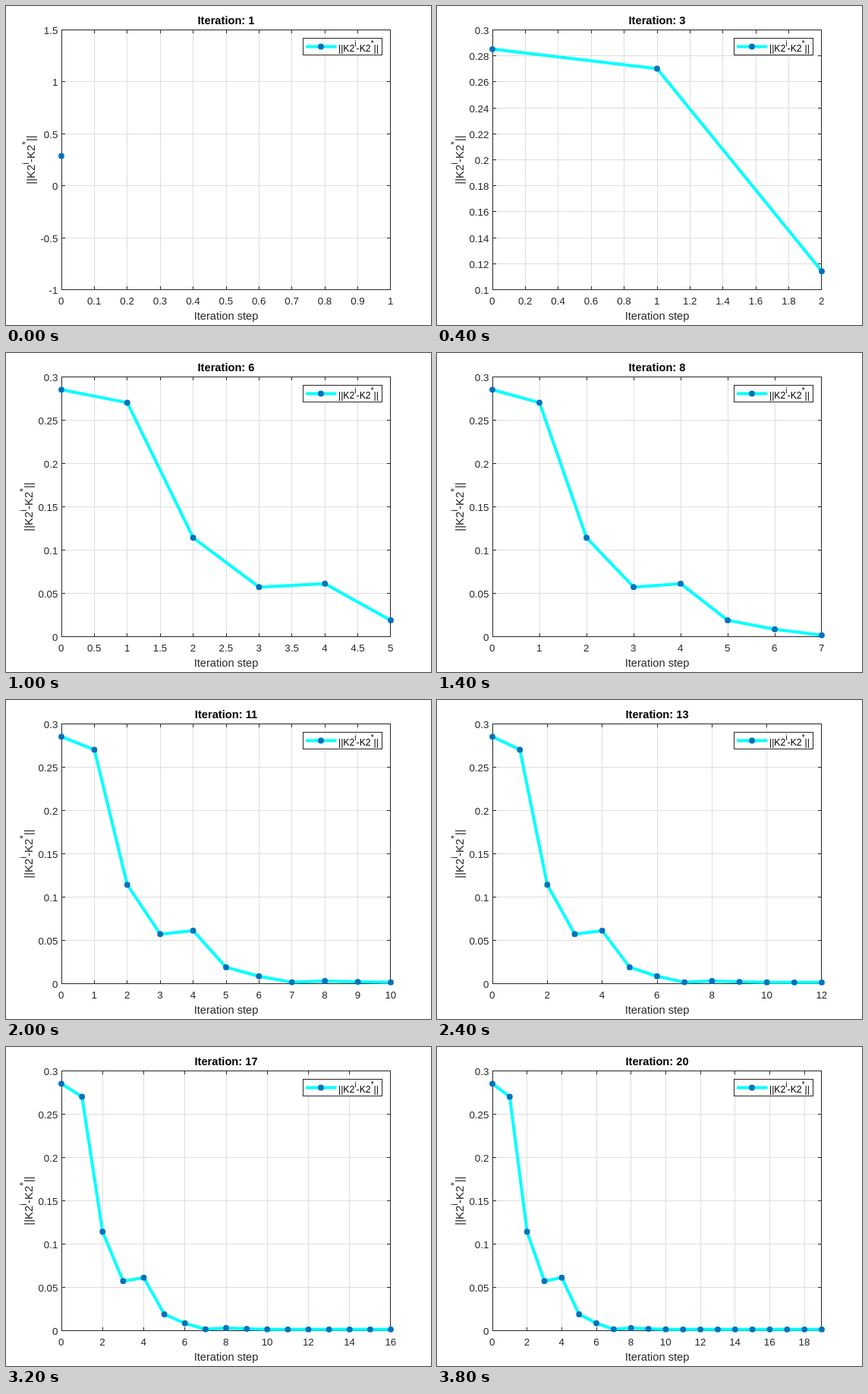
An HTML page with a canvas for the animation above (4 s loop, 560 by 420 pixels).

```html
<!DOCTYPE html>
<html lang="en">
<head>
<meta charset="utf-8">
<title>Iteration plot</title>
<style>
  html, body { margin: 0; width: 100%; height: 100%; overflow: hidden; background: #fff; }
  canvas { display: block; }
</style>
</head>
<body>
<canvas id="plot" width="560" height="420"></canvas>
<script>
const ctx = document.getElementById('plot').getContext('2d');
const FONT = '"Liberation Sans", Arial, sans-serif';
const INK = '#262626', GRID = '#dedede', LINE = '#00ffff', DOT = '#0072bd';
const BOX = { left: 73, right: 506, top: 31, bottom: 373 };
const X0 = 72.8, WIDTH = 434;
const STEP_MS = 200, COUNT = 20;

const head = [0.285, 0.27, 0.114, 0.057, 0.061, 0.0187, 0.0083, 0.0014, 0.0028, 0.0019, 0.0013];
const values = Array.from({ length: COUNT }, (_, i) => head[i] ?? 0.0012);

// Smallest 1-2-5 step that splits the range into at most 11 parts.
function niceStep(range) {
  for (let p = -4; p < 3; p++) {
    for (const k of [1, 2, 5]) {
      const step = k * 10 ** p;
      if (range / step <= 11 + 1e-6) return step;
    }
  }
}

function ticks(lo, hi, step) {
  const list = [];
  for (let i = Math.round(lo / step); i * step <= hi + 1e-9; i++) {
    list.push(Number((i * step).toFixed(6)));
  }
  return list;
}

function yRange(data) {
  if (data.length === 1) return [-1, 1.5, 0.5];
  const lo = Math.min(...data), hi = Math.max(...data);
  const step = niceStep(hi - lo);
  return [Math.floor(lo / step + 1e-6) * step, Math.ceil(hi / step - 1e-6) * step, step];
}

function rect(x, y, w, h, color) {
  ctx.fillStyle = color;
  ctx.fillRect(x, y, w, h);
}

function text(str, x, y, size, align, color = INK, weight = '') {
  ctx.font = `${weight} ${size}px ${FONT}`;
  ctx.textAlign = align;
  ctx.fillStyle = color;
  ctx.fillText(str, x, y);
}

function dot(x, y) {
  ctx.beginPath();
  ctx.arc(x, y, 3.9, 0, Math.PI * 2);
  ctx.fillStyle = DOT;
  ctx.fill();
}

function polyline(points) {
  ctx.beginPath();
  points.forEach(([x, y]) => ctx.lineTo(x, y));
  ctx.strokeStyle = LINE;
  ctx.lineWidth = 4;
  ctx.lineJoin = 'round';
  ctx.stroke();
}

// Norm label with superscripts; returns its width.
function normLabel(x, y, size, color, draw = true) {
  const parts = [['||K2', 0], ['i', 1], ['-K2', 0], ['*', 1], ['||', 0]];
  let pos = x;
  for (const [str, sup] of parts) {
    const s = sup ? size * 0.82 : size;
    ctx.font = `${s}px ${FONT}`;
    const w = ctx.measureText(str).width;
    if (draw) text(str, pos, y - (sup ? size * 0.54 : 0), s, 'left', color);
    pos += w;
  }
  return pos - x;
}

function drawLegend() {
  rect(391, 42, 105, 23, INK);
  rect(392, 43, 103, 21, '#fff');
  polyline([[395, 53.5], [435.5, 53.5]]);
  dot(415, 53.5);
  normLabel(438, 60, 12.25, '#000');
}

function drawPlot(n) {
  const data = values.slice(0, n);
  const xMax = Math.max(1, n - 1);
  const [yLo, yHi, yStep] = yRange(data);
  const px = v => X0 + v / xMax * WIDTH;
  const py = v => BOX.bottom - (v - yLo) / (yHi - yLo) * (BOX.bottom - BOX.top);
  const col = v => Math.min(BOX.right, Math.floor(px(v) + 0.3));
  const xs = ticks(0, xMax, niceStep(xMax));
  const ys = ticks(yLo, yHi, yStep);
  const { left: l, right: r, top: t, bottom: b } = BOX;

  rect(0, 0, 560, 420, '#fff');
  xs.forEach(v => rect(col(v), t, 1, b - t, GRID));
  ys.forEach(v => rect(l, Math.round(py(v)), r - l, 1, GRID));

  rect(l, t, r - l + 1, 1, INK);
  rect(l, b, r - l + 1, 1, INK);
  rect(l, t, 1, b - t + 1, INK);
  rect(r, t, 1, b - t + 1, INK);

  for (const v of xs) {
    const x = Math.max(l, col(v));
    rect(x, t, 1, 5, INK);
    rect(x, b - 4, 1, 5, INK);
    text(String(v), px(v), 393, 13.333, 'center');
  }
  let widest = 0;
  for (const v of ys) {
    const y = Math.round(py(v));
    rect(l, y, 5, 1, INK);
    rect(r - 4, y, 5, 1, INK);
    text(String(v), 68.4, y + 6, 13.333, 'right');
    widest = Math.max(widest, ctx.measureText(String(v)).width);
  }

  text('Iteration: ' + n, 290, 24, 14.667, 'center', '#000', 'bold');
  text('Iteration step', 290, 413, 14.667, 'center');
  ctx.save();
  ctx.translate(60.8 - widest, 202.5);
  ctx.rotate(-Math.PI / 2);
  normLabel(-normLabel(0, 0, 14.9, INK, false) / 2, 0, 14.9, INK);
  ctx.restore();

  const points = data.map((v, i) => [px(i) + 0.2, py(v) + 0.2]);
  if (n > 1) polyline(points);
  points.forEach(([x, y]) => dot(x, y));
  drawLegend();
}

const start = performance.now();
let shown = 0;

function tick() {
  const elapsed = Math.max(0, performance.now() - start);
  const n = Math.floor(elapsed / STEP_MS) % COUNT + 1;
  if (n !== shown) drawPlot(shown = n);
  requestAnimationFrame(tick);
}
tick();
</script>
</body>
</html>
```
